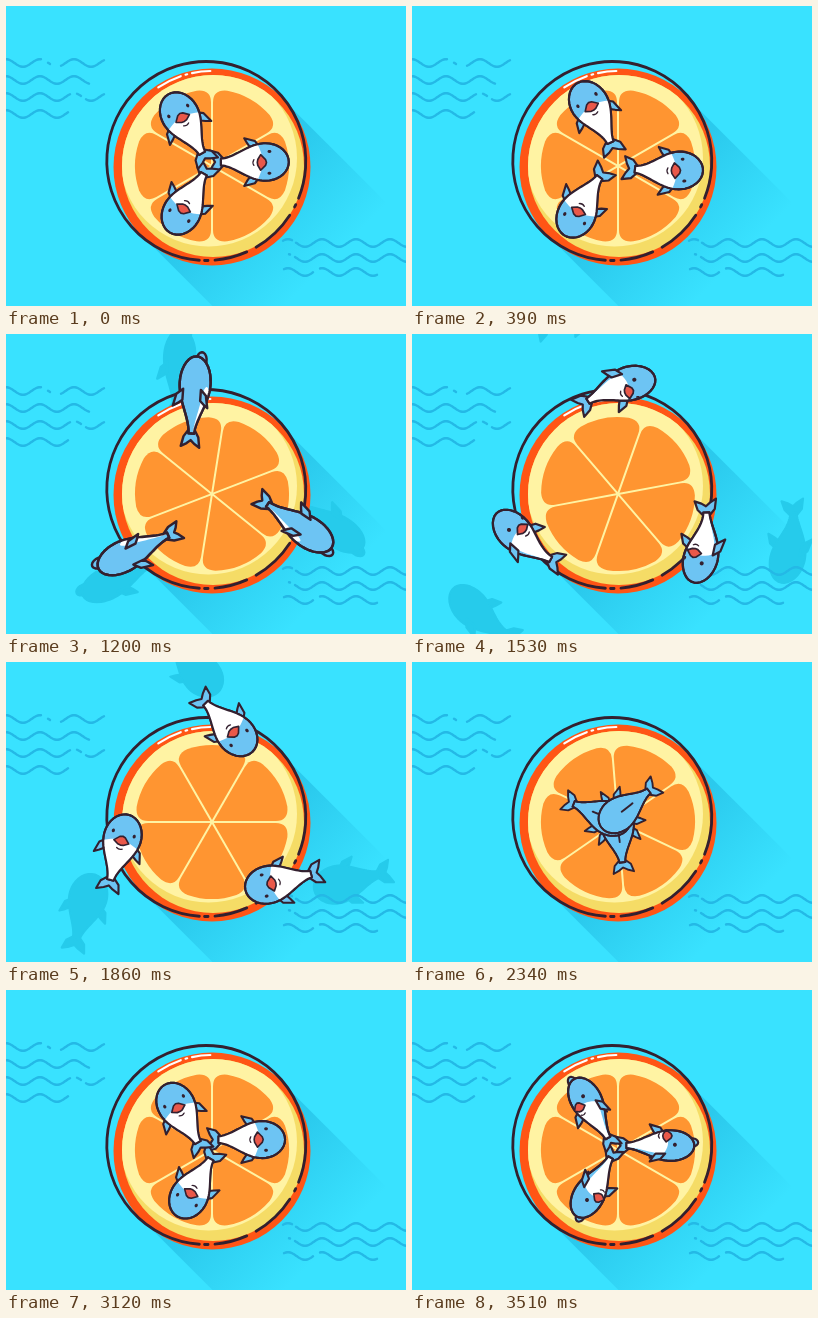
An HTML page with a canvas for the animation above (3.54 s loop, 400x300 px).

```html
<!DOCTYPE html>
<html lang="en">
<head>
<meta charset="utf-8">
<title>Dolphins and orange</title>
<style>
html, body { margin: 0; width: 100%; height: 100%; overflow: hidden; background: #39e2ff; }
canvas { display: block; width: 400px; height: 300px; }
</style>
</head>
<body>
<canvas id="stage" width="400" height="300"></canvas>
<script>
const ctx = document.getElementById('stage').getContext('2d');
const { sin, cos, abs, sqrt, exp, min, max, PI } = Math;
const LOOP = 3540, RAD = PI / 180;
const INK = '#33202f', BLUE = '#6dc4f3', SHADE = '#26cbeb', WAVE = '#24b9e6';
const FRUIT = { x: 206, y: 160 }, POD = { x: 203, y: 157 };

// The closed path one dolphin swims: time, x, y from the pod's centre
const PATH = [[0, 41, -1], [750, 60, 16], [1200, 86, 32], [1860, 74, 62], [2340, 4, 18], [2790, 33, -7]];

const ramp = (t, from, to) => min(1, max(0, (t - from) / (to - from)));
const smooth = u => u * u * (3 - 2 * u);
const bump = (t, peak, width) => exp(-(((t - peak) / width) ** 2));

// Point on the path, smooth across the loop seam
function swim(t) {
  const n = PATH.length;
  const key = i => {
    const lap = Math.floor(i / n), [at, x, y] = PATH[i - lap * n];
    return [at + lap * LOOP, x, y];
  };
  let i = 0;
  while (key(i + 1)[0] <= t) i++;
  const [a, b, c, d] = [-1, 0, 1, 2].map(k => key(i + k));
  const span = c[0] - b[0], u = (t - b[0]) / span, v = 1 - u;
  return [1, 2].map(k => {
    const m0 = (c[k] - a[k]) / (c[0] - a[0]) * span;
    const m1 = (d[k] - b[k]) / (d[0] - b[0]) * span;
    return b[k] * smooth(v) + c[k] * smooth(u) + m0 * u * v * v - m1 * u * u * v;
  });
}

function poseAt(t) {
  const spin = 720 * smooth(ramp((t + 400) % LOOP, 0, 800));
  return {
    at: swim(t),
    heading: 360 * ramp(t, 1030, 2830),
    roll: spin + 110 * bump(t, 1200, 280) + 360 * ramp(t, 1890, 2790),
    scale: .97 + .14 * bump(t, 1250, 250) - .16 * bump(t, 2565, 380),
    bend: 24 * bump(t, 750, 250) - 6 * bump(t, 1530, 200)
  };
}

// The slice turns slowly at first, then catches up with the divers
const sliceTurn = t => 30 * ramp(t, 920, 1860) + 30 * smooth(ramp(t, 1860, 2500)) ;

function disc(x, y, r, fill) {
  ctx.beginPath();
  ctx.arc(x, y, r, 0, 7);
  ctx.fillStyle = fill;
  ctx.fill();
}

function arcs(x, y, r, color, width, spans) {
  ctx.strokeStyle = color;
  ctx.lineWidth = width;
  for (const [a, b] of spans) {
    ctx.beginPath();
    ctx.arc(x, y, r, a * RAD, b * RAD);
    ctx.stroke();
  }
}

function wave(y, crest, ...spans) {
  ctx.strokeStyle = WAVE;
  ctx.lineWidth = 2.4;
  for (const [a, b] of spans) {
    ctx.beginPath();
    for (let x = a; x <= b; x++) ctx.lineTo(x, y - 3.8 * cos((x - crest) * 2 * PI / 34));
    ctx.stroke();
  }
}

function waves() {
  wave(57, 0, [-2, 35], [42, 44], [55, 98]);
  wave(74, 0, [-2, 83]);
  wave(91, 0, [-2, 64], [71, 75], [80, 98]);
  wave(108, 0, [-2, 62]);
  wave(237, 282, [277, 286], [290, 402]);
  wave(252, 282, [283, 284], [289, 402]);
  wave(266, 282, [278, 307], [314, 371]);
}

function longShadow() {
  ctx.save();
  ctx.translate(FRUIT.x, FRUIT.y + 1);
  ctx.rotate(PI / 4);
  const g = ctx.createLinearGradient(40, 0, 150, 0);
  g.addColorStop(0, 'rgba(10,145,195,.3)');
  g.addColorStop(1, 'rgba(10,145,195,0)');
  ctx.fillStyle = g;
  ctx.fillRect(0, -98, 160, 196);
  ctx.restore();
}

function orange(angle) {
  disc(206, 161, 98.5, '#ff5515');
  disc(207, 160, 91, '#f5dc66');
  ctx.save();
  ctx.beginPath();
  ctx.arc(207, 160, 91, 0, 7);
  ctx.clip();
  disc(202.5, 152, 88.5, '#fff3a3');
  ctx.restore();

  ctx.fillStyle = '#ff9531';
  const at = (r, a) => [r * cos(a * RAD), r * sin(a * RAD)];
  for (let k = 0; k < 6; k++) {
    ctx.save();
    ctx.translate(FRUIT.x, FRUIT.y);
    ctx.rotate((angle + k * 60) * RAD);
    ctx.translate(2, 0);
    ctx.beginPath();
    ctx.moveTo(0, 0);
    ctx.lineTo(...at(62, -30));
    ctx.quadraticCurveTo(...at(75, -30), ...at(75, -19));
    ctx.arc(0, 0, 75, -19 * RAD, 19 * RAD);
    ctx.quadraticCurveTo(...at(75, 30), ...at(62, 30));
    ctx.fill();
    ctx.restore();
  }
  arcs(206, 161, 96, '#fff', 2.2, [[-124, -109], [-106, -105], [-102, -91]]);
  arcs(200.3, 155, 99.5, INK, 2.8, [[94, 382], [26, 27.5], [33, 60], [66, 85], [89, 91]]);
}

function halfWidth(x) {
  if (x > 16) return 19.5 * sqrt(max(0, 1 - ((x - 16) / 24) ** 2));
  return 3.5 + 16 * sin((x + 30) / 46 * PI / 2) ** 1.7;
}
const SPINE = [];
for (let x = -30; x < 16; x += 2) SPINE.push(x);
for (let a = 0; a <= 90; a += 10) SPINE.push(16 + 24 * sin(a * RAD));

const mirror = half => [...half, ...half.slice().reverse().map(([x, y]) => [x, -y])];

// Belly faces the viewer at roll 0, the back at 180
function dolphin({ heading, roll, scale, bend }, flat) {
  const side = a => sin((a + roll) * RAD), front = a => cos((a + roll) * RAD);
  const slim = 1 - .3 * abs(side(0));
  const w = x => halfWidth(x) * slim;
  const pt = (x, y) => {
    const slope = -bend * x / 800, len = sqrt(1 + slope * slope);
    return [x - y * slope / len, y / len - bend * ((x / 40) ** 2 - .4)];
  };

  function shape(points, fill, line = 2.2) {
    ctx.beginPath();
    for (const p of points) ctx.lineTo(...pt(...p));
    ctx.closePath();
    ctx.fillStyle = flat || fill;
    ctx.fill();
    if (!line) return;
    ctx.strokeStyle = flat || INK;
    ctx.lineWidth = line;
    ctx.stroke();
  }
  function oval(x, y, rx, ry, fill, line) {
    const ring = [];
    for (let a = 0; a < 360; a += 20) ring.push([x + rx * cos(a * RAD), y + ry * sin(a * RAD)]);
    shape(ring, fill, line);
  }
  function fin(a, reach) {
    const y = w(4) * side(a) * .9, tip = reach * side(a), mix = k => y + (tip - y) * k;
    shape([[10, y], [5, mix(.7)], [-6, tip], [-3, mix(.45)], [0, y]], BLUE);
  }
  const fins = [[-80, 25], [80, 25], [180, 20]];

  ctx.save();
  ctx.rotate(heading * RAD);
  ctx.scale(scale, scale);

  const f = 12 * max(.7, abs(front(0)));
  shape(mirror([[-27, -3], [-33, -f * .8], [-42, -f], [-39, -f * .4], [-36, 0]]), BLUE);
  if (abs(side(0)) > .6) oval(37, 5 * side(0), 7, 4.5, BLUE, 2.2);
  for (const [a, reach] of fins) if (front(a) < .25) fin(a, reach);

  const body = mirror(SPINE.map(x => [x, -w(x)]));
  shape(body, BLUE);

  if (!flat) {
    const turn = ((roll + 180) % 360 + 360) % 360 - 180;
    const lo = max(-90, turn - 76), hi = min(90, turn + 76);
    if (lo < hi) {
      const top = sin(lo * RAD), bottom = sin(hi * RAD);
      const xs = SPINE.filter(x => x <= 8), white = xs.map(x => [x, w(x) * top]);
      for (let u = .1; u < 1; u += .1)
        white.push([8 + 5 * sin(u * PI), w(10) * (top + (bottom - top) * u)]);
      for (const x of xs.reverse()) white.push([x, w(x) * bottom]);
      shape(white, '#fff', 0);
    }
    shape(body, 'transparent');

    for (const a of [-36, 36])
      if (front(a) > .1) oval(20, w(20) * side(a), 2, 2 * front(a), INK, 0);
    const c = front(0), y = w(14) * side(0);
    if (c > .1) {
      shape([[17, y], [16, y + 3 * c], [11, y + 8 * c], [8, y + 3 * c], [7.5, y],
        [8, y - 3 * c], [11, y - 8 * c], [16, y - 3 * c]], '#e9584a', 1.7);
      ctx.beginPath();
      ctx.moveTo(...pt(4, y - 3 * c));
      ctx.quadraticCurveTo(...pt(2, y), ...pt(4, y + 3 * c));
      ctx.lineWidth = 1.3;
      ctx.stroke();
    }
  }
  for (const [a, reach] of fins) if (front(a) >= .25) fin(a, reach);
  ctx.restore();
}

function pod(pose, offset, flat) {
  for (let k = 0; k < 3; k++) {
    ctx.save();
    ctx.translate(POD.x, POD.y);
    ctx.rotate(k * 120 * RAD);
    ctx.translate(pose.at[0] + offset, pose.at[1]);
    dolphin(pose, flat);
    ctx.restore();
  }
}

function draw(t) {
  const pose = poseAt(t), jump = ramp(t, 1080, 2160);
  ctx.fillStyle = '#39e2ff';
  ctx.fillRect(0, 0, 400, 300);
  ctx.lineCap = ctx.lineJoin = 'round';
  longShadow();
  if (jump > 0 && jump < 1) pod(pose, 90 * sin(jump * PI), SHADE);
  waves();
  orange(sliceTurn(t));
  pod(pose, 0, null);
}

const start = performance.now();
function tick() {
  draw((performance.now() - start) % LOOP);
  requestAnimationFrame(tick);
}
tick();
</script>
</body>
</html>
```
